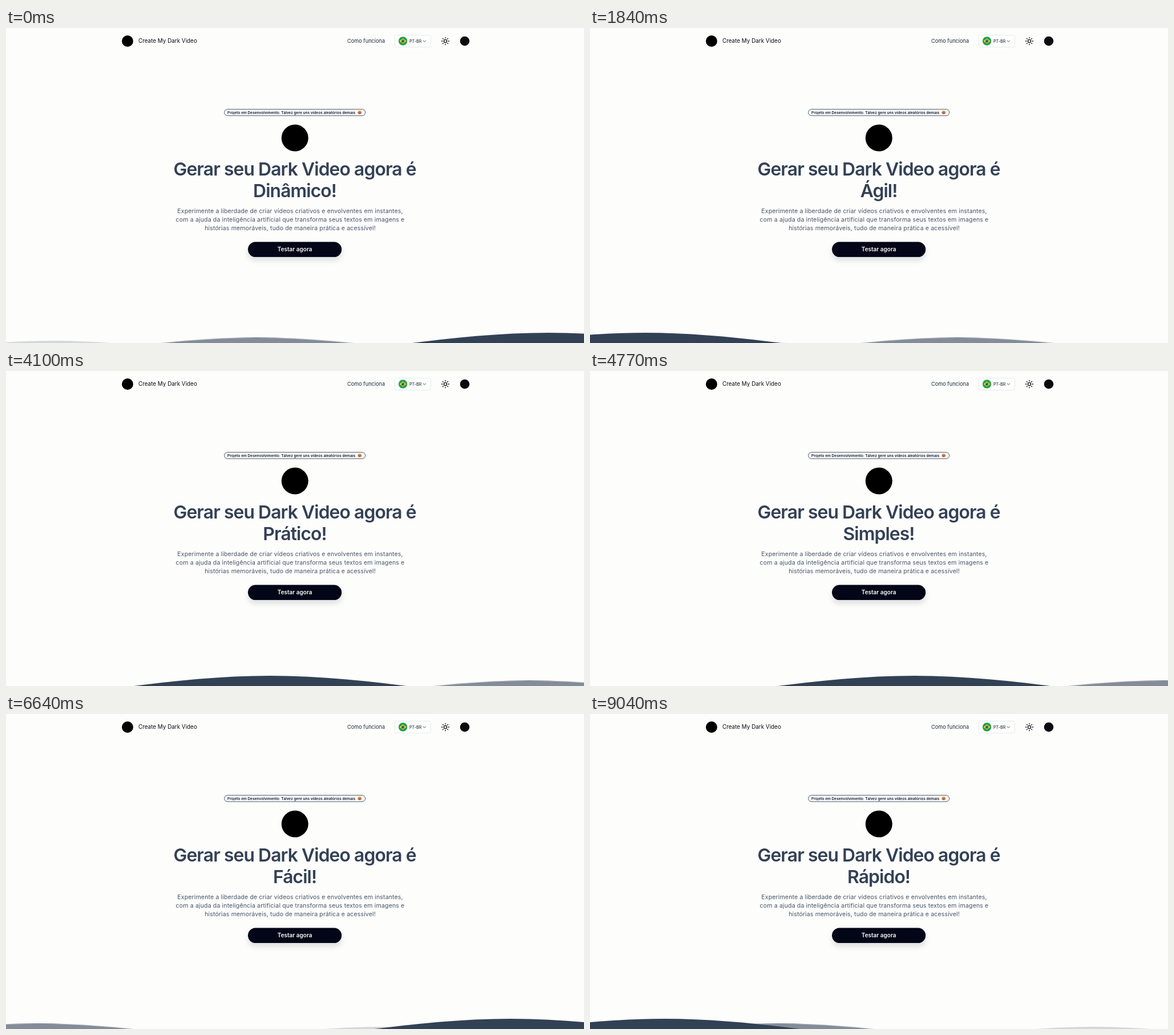
An HTML page for the animation above (9080 ms loop, 1013x553 px).

```html
<!DOCTYPE html>
<html lang="pt-BR">
<head>
<meta charset="utf-8">
<title>Create My Dark Video</title>
<style>
  html, body {
    margin: 0;
    width: 100%;
    height: 100%;
    overflow: hidden;
    background: #fdfdfc;
  }
  #stage {
    display: block;
    width: 1013px;
    height: 553px;
    font-family: Inter, "Open Sans", sans-serif;
    font-optical-sizing: none;
  }
  .brand { font-size: 9.9px; fill: #0a0c14; }
  .link { font-size: 9.2px; fill: #1e293b; }
  .lang { font-size: 7.2px; fill: #0f172a; }
  .mid { text-anchor: middle; }
  .badge { font-size: 6.55px; font-weight: 600; fill: #0f172a; }
  .title { font-size: 31.9px; font-weight: 600; letter-spacing: -.95px; fill: #334155; }
  .lead { font-size: 10.6px; letter-spacing: .12px; fill: #475569; }
  .cta { font-size: 10px; font-weight: 600; fill: #fff; }
  .button { fill: #020617; filter: drop-shadow(0 6px 5px rgba(2, 6, 23, .13)); }
  .line { fill: none; stroke: #0a0c14; stroke-linecap: round; stroke-linejoin: round; }
  .wave { fill: #334155; }
</style>
</head>
<body>
<svg id="stage" viewBox="0 0 1013 553">
  <defs>
    <path id="swell" d="M-160 44c30 0 58-18 88-18s58 18 88 18 58-18 88-18 58 18 88 18v44h-352z"/>
  </defs>

  <!-- header -->
  <circle cx="213" cy="23" r="10"/>
  <text class="brand" x="232" y="26.3">Create My Dark Video</text>
  <text class="link" x="598" y="25.7">Como funciona</text>

  <rect x="681.5" y="12.5" width="63" height="21" rx="3" fill="#fff" fill-opacity=".5" stroke="#e5e7eb" stroke-width=".9"/>
  <g transform="translate(695.6 22.9)">
    <circle r="7.6" fill="#17a34a"/>
    <path d="M-6 0 0-4.6 6 0 0 4.6z" fill="#f2d51f"/>
    <circle r="2.5" fill="#1f3a7a"/>
    <path d="M-2.3-.8Q.5-1 2.2 1" fill="none" stroke="#e8eef5" stroke-width=".6"/>
  </g>
  <text class="lang" x="707" y="25.6">PT-BR</text>
  <path class="line" d="M731.1 22l2.3 2.1 2.3-2.1" stroke-width=".7"/>

  <g class="line" transform="translate(770 23) scale(.65)" stroke-width="2">
    <circle r="4"/>
    <path d="M0-10v2M0 8v2M-10 0h2M8 0h2M-7.1-7.1l1.4 1.4M5.7 5.7l1.4 1.4M-7.1 7.1l1.4-1.4M5.7-5.7l1.4-1.4"/>
  </g>
  <circle cx="804" cy="23" r="8.3" fill="#0a0c10"/>

  <!-- hero -->
  <rect x="382.7" y="142.7" width="247" height="11.2" rx="5.6" fill="#fdfdfe" stroke="#334155" stroke-width=".9"/>
  <text class="badge" x="388" y="150.5">Projeto em Desenvolvimento: Talvez gere uns vídeos aleatórios demais</text>
  <g transform="translate(619.8 148.3)">
    <circle r="3.2" fill="#f39a3c"/>
    <path d="M-2.1.1h4.2a2.1 2.1 0 0 1-4.2 0z" fill="#b3263a"/>
    <path d="M-1.9-.8l.7-.6.7.6M.5-.8l.7-.6.7.6" fill="none" stroke="#8a2f22" stroke-width=".5"/>
    <circle cx="-2.8" cy=".8" r=".9" fill="#4d9be0"/>
    <circle cx="2.8" cy=".8" r=".9" fill="#4d9be0"/>
  </g>

  <circle cx="506.3" cy="193" r="23.5"/>

  <text class="title mid" x="506.1" y="258.6">Gerar seu Dark Video agora é</text>
  <text class="title mid" id="word" x="506.1" y="296.9">Dinâmico!</text>

  <g class="lead mid">
    <text x="498" y="325">Experimente a liberdade de criar vídeos criativos e envolventes em instantes,</text>
    <text x="498" y="339.9">com a ajuda da inteligência artificial que transforma seus textos em imagens e</text>
    <text x="498" y="354.8">histórias memoráveis, tudo de maneira prática e acessível!</text>
  </g>

  <rect class="button" x="424" y="375.5" width="164.3" height="26.6" rx="13.3"/>
  <text class="cta mid" x="506.2" y="392.2">Testar agora</text>

  <!-- waves: period and phase in ms -->
  <svg y="529.3" width="1012.3" height="79.1" viewBox="0 24 150 28" preserveAspectRatio="none">
    <use class="wave" href="#swell" x="48" y="5" opacity=".2" data-period="13000" data-phase="9190"/>
    <use class="wave" href="#swell" x="48" y="3" opacity=".6" data-period="10000" data-phase="200"/>
    <use class="wave" href="#swell" x="48" y="0" data-period="7000" data-phase="3190"/>
  </svg>
</svg>
<script>
  const LOOP = 9080;
  const WORD_STEP = 2000;
  const FIRST_SWITCH = 400;
  const words = ["Dinâmico!", "Ágil!", "Prático!", "Simples!", "Fácil!", "Rápido!"];
  const word = document.getElementById("word");

  const waves = [...document.querySelectorAll(".wave")].map(el => {
    const anim = el.animate(
      { transform: ["translate(-90px, 0)", "translate(85px, 0)"] },
      {
        duration: +el.dataset.period,
        iterations: Infinity,
        easing: "cubic-bezier(.55, .5, .45, .5)"
      }
    );
    anim.pause();
    return { anim, phase: +el.dataset.phase };
  });

  function draw(t) {
    for (const { anim, phase } of waves) anim.currentTime = phase + t;
    const i = Math.floor((t - FIRST_SWITCH) / WORD_STEP) + 1;
    if (word.textContent !== words[i]) word.textContent = words[i];
  }

  const start = performance.now();
  function tick() {
    draw((performance.now() - start) % LOOP);
    requestAnimationFrame(tick);
  }
  tick();
</script>
</body>
</html>
```
